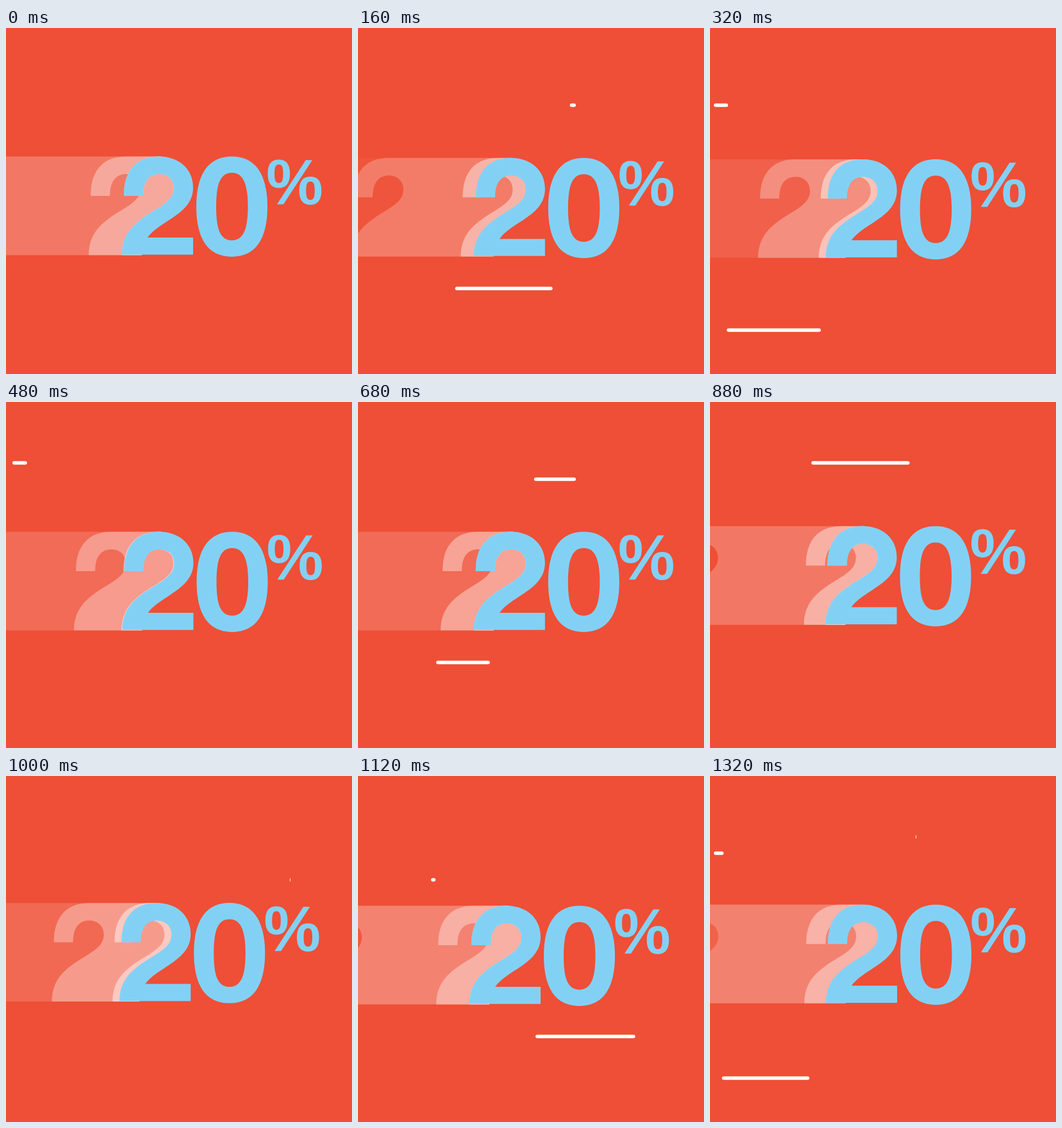
Write an HTML page that moves like this. It is 540x540 px and loops after 1360 ms.

```html
<!DOCTYPE html>
<html lang="en">
<head>
<meta charset="utf-8">
<title>20%</title>
<style>
  html, body { margin: 0; width: 100%; height: 100%; overflow: hidden; background: #ee4f36; }
  svg { display: block; width: 100%; height: 100%; }
  text { font: bold 100px "Liberation Sans", Arial, sans-serif; }
</style>
</head>
<body>
<svg viewBox="0 0 540 540" role="img" aria-label="20%">
  <g id="lines" fill="#fff"></g>
  <g id="group">
    <g id="trail" fill="#fff"></g>
    <g fill="#82d1f5">
      <path id="two"/>
      <path fill-rule="evenodd" d="M352.5 200.5C391 200.5 408 231 408 278.8C408 327 391 357 352.5 357C314 357 297 327 297 278.8C297 231 314 200.5 352.5 200.5ZM352.5 226C334 226 328 245 328 278.8C328 313 334 331.5 352.5 331.5C371 331.5 377.5 313 377.5 278.8C377.5 245 371 226 352.5 226Z"/>
      <text x="406" y="275">%</text>
    </g>
  </g>
</svg>
<script>
const STEP = 40, FRAMES = 34;
const $ = id => document.getElementById(id);

function add(parent, tag, attrs = {}) {
  const el = document.createElementNS("http://www.w3.org/2000/svg", tag);
  set(el, attrs);
  parent.appendChild(el);
  return el;
}
function set(el, attrs) {
  for (const k in attrs) el.setAttribute(k, attrs[k]);
}
const clamp = x => Math.max(0, Math.min(1, x));
const ease = x => (x = clamp(x), x * x * (3 - 2 * x));

// Left side of the numeral, from its foot up to the top of the arch
function leftSide(d, foot) {
  const p = (x, y) => `${(x + d).toFixed(2)} ${y} `;
  return `${p(181, foot)}C${p(181, 326)}${p(195, 310)}${p(213, 297)}` +
    `C${p(236, 280)}${p(262, 272)}${p(262, 250)}` +
    `C${p(262, 236)}${p(252, 228)}${p(239, 228)}` +
    `C${p(223, 228)}${p(214, 240)}${p(214, 262)}L${p(184, 262)}` +
    `C${p(184, 222)}${p(204, 200.6)}${p(239, 200.6)}`;
}
$("two").setAttribute("d", "M" + leftSide(0, 353.7) +
  "C270 200.6 292 220 292 249C292 291 240 300 221 327H292V353.7Z");

// The echo's left side drifts away while its right side stays behind the numeral
const echoPath = d => "M212 354.5L" + leftSide(d, 354.5) +
  "H239C265 201 280 220 280 249C280 283 235 295 212 330Z";

const echoes = [17, 17, 19, 20, 17, 17].map((life, i) => ({
  life, birth: Math.floor(i * FRAMES / 6), el: add($("trail"), "path")
}));

function drawEchoes(f) {
  for (const e of echoes) {
    const a = (f - e.birth + FRAMES) % FRAMES;
    const d = -a * a * (1.1 + 0.02 * a + 0.0061 * a * a);
    set(e.el, { d: echoPath(d), "fill-opacity": 0.55 * Math.max(0, 1 - a / e.life) });
  }
}

// Speed lines: y, right end, left end, head start, tail start, tail duration
const CYCLE = 12.45, HEAD = 3;
const lines = [
  [162, 444, 114, 0, 1, 2.3],
  [406.5, 445, 122, 1.56, 2.79, 2.64],
  [120.5, 340, 6, 3.7, 5, 3.56],
  [471.5, 340, 6, 5.45, 6.6, 2.8],
  [95, 322, 10, 8, 9.18, 3.38]
].map(spec => ({
  spec, el: add($("lines"), "rect", { y: spec[0] - 2.8, height: 5.6, rx: 2.8 })
}));

function drawLines(f) {
  const p = f % CYCLE;
  for (const { spec: [, right, left, head, tail, dur], el } of lines) {
    const at = k => right + (left - right) * k;
    const x = at(ease((p - head) / HEAD));
    const w = at(ease((p - tail) / dur)) - x;
    set(el, { x, width: w > 1 ? w : 0 });
  }
}

// Shake: frame, x, y
const shake = [
  [0, 0, 0], [8, -0.3, 4.3], [12, 0.5, 2], [17, -0.2, 2],
  [22, -0.5, -6.8], [28, -7, 2], [33, 0, 0.2], [34, 0, 0]
];
function drawShake(f) {
  const i = shake.findIndex(k => k[0] > f);
  const a = shake[i - 1], b = shake[i];
  const k = ease((f - a[0]) / (b[0] - a[0]));
  const mix = n => a[n] + (b[n] - a[n]) * k;
  $("group").setAttribute("transform", `translate(${mix(1)} ${mix(2)})`);
}

function render(ms) {
  const f = Math.floor(ms / STEP) % FRAMES;
  drawEchoes(f);
  drawLines(f);
  drawShake(f);
}
function tick(now) {
  render(Math.max(0, now));
  requestAnimationFrame(tick);
}
render(0);
requestAnimationFrame(tick);
</script>
</body>
</html>
```
